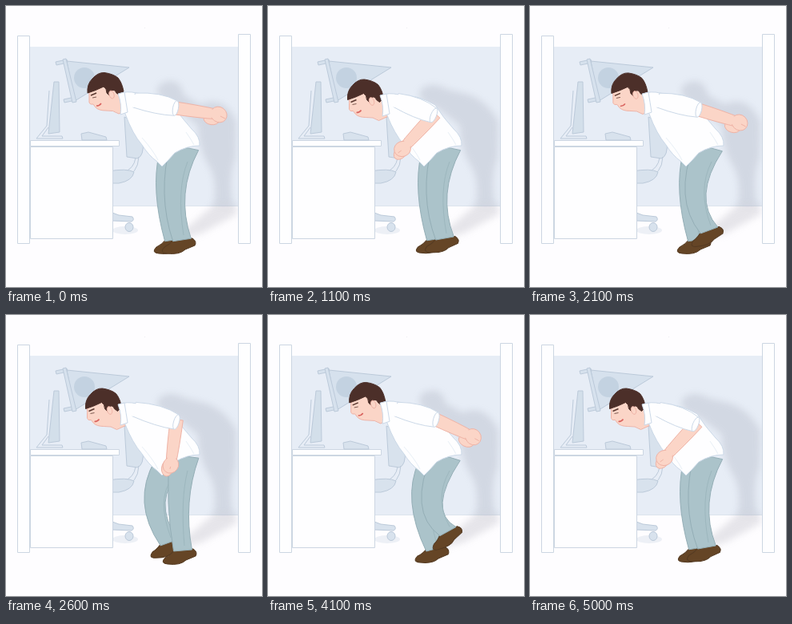
Animation, 320 px wide and 352 px high, one loop 5.1 s. Source, as an HTML page with a canvas:

```html
<!DOCTYPE html>
<html lang="en">
<head>
<meta charset="utf-8">
<title>Office swing</title>
<style>
html, body { margin: 0; width: 100%; height: 100%; overflow: hidden; background: #fefdff; }
canvas { display: block; }
</style>
</head>
<body>
<canvas id="stage" width="320" height="352"></canvas>
<script>
const ctx = document.getElementById('stage').getContext('2d');
const LOOP = 5100, STEP = 100, SWING = 1950;
const LINE = '#bccada', EDGE = '#ccd6e2', SKIN = '#fbd5c7', SKIN_LINE = '#efb3a6';
const SHIRT_LINE = '#ccd9e8', CLOTH = '#abc3ca', CLOTH_LINE = '#94aeb6';

// phase, head drop, elbow x y, hand x y, far ankle x y, far knee x, near ankle x y, near knee x
const POSES = [
  [0, 0, 212, 128, 266, 136, 210, 293, 201, 220, 293, 211],
  [.077, .05, 211, 130, 262, 146, 209, 293, 200, 224, 281, 207],
  [.1, .1, 210, 131, 257, 152, 209, 293, 193, 225, 271, 205],
  [.2, .6, 213, 136, 239, 178, 207, 292, 191, 225, 277, 209],
  [.333, 1, 213, 134, 206, 188, 204, 285, 186, 221, 295, 216],
  [.564, 1, 207, 137, 168, 179, 210, 292, 201, 221, 291, 211],
  [.65, 1, 209, 140, 208, 192, 209, 292, 198, 221, 292, 211],
  [.744, 1, 209, 146, 249, 180, 209, 292, 195, 220, 292, 210],
  [.85, .45, 211, 138, 266, 160, 209, 293, 198, 220, 293, 211],
];

const mix = (a, b, u) => a + (b - a) * u;

function poseAt(phase) {
  const i = POSES.findLastIndex(p => p[0] <= phase);
  const a = POSES[i], b = POSES[(i + 1) % POSES.length];
  const u = (phase - a[0]) / ((b[0] || 1) - a[0]);
  return a.map((v, j) => mix(v, b[j], u));
}

function paint(path, fill, line, width = 1) {
  if (fill) { ctx.fillStyle = fill; ctx.fill(path); }
  if (line) { ctx.strokeStyle = line; ctx.lineWidth = width; ctx.stroke(path); }
}
const shape = (d, fill, line, width) => paint(new Path2D(d), fill, line, width);

function box(x, y, w, h) {
  const p = new Path2D();
  p.rect(x + .5, y + .5, w, h);
  paint(p, '#fefeff', EDGE);
}

function oval(x, y, rx, ry, angle, fill, line) {
  const p = new Path2D();
  p.ellipse(x, y, rx, ry, angle, 0, 7);
  paint(p, fill, line);
}

// Tapered tube through three joints given as [x, y, half width]
function limb(a, b, c, fill, line) {
  const side = s => [a, b, c].map(([x, y, w], i) => {
    const [p, q] = [[a, b], [a, c], [b, c]][i];
    const len = Math.hypot(q[0] - p[0], q[1] - p[1]) || 1;
    return [x - s * w * (q[1] - p[1]) / len, y + s * w * (q[0] - p[0]) / len];
  });
  const ctrl = (p, q, r) => [0, 1].map(k => 2 * q[k] - (p[k] + r[k]) / 2);
  const [l0, l1, l2] = side(1), [r0, r1, r2] = side(-1);
  shape(`M${l0}Q${ctrl(l0, l1, l2)} ${l2}L${r2}Q${ctrl(r0, r1, r2)} ${r0}Z`, fill, line);
}

function room() {
  ctx.fillStyle = '#fefdff';
  ctx.fillRect(0, 0, 320, 352);
  ctx.fillStyle = '#e7edf6';
  ctx.fillRect(30, 51, 260, 199);
  shape('M133 250.5H290', null, '#dce4ed');
  ctx.fillStyle = '#ececf2';
  ctx.fillRect(173, 27, 1, 1);
}

function pennant() {
  const fill = '#d6e1ed';
  shape('M76 69L154 77L86 119Z', fill, LINE);
  oval(98, 90, 13, 13, 0, '#c3d2e1');
  shape('M62 70L76 67L77 71L63 74ZM72 117L86 114L87 118L73 121Z', fill, LINE);
  shape('M71 67L75 66L88 120L83 121Z', fill, LINE);
}

function chair() {
  const fill = '#d8e2ed';
  oval(149, 281, 16, 5, 0, '#edf0f6');
  shape('M148 139C158 142 170 154 171 169Q173 188 164 191L151 189Z', fill, LINE);
  shape('M166 189Q165 211 145 216M162 190Q160 204 147 208', null, LINE);
  shape('M128 207Q151 203 160 208Q158 219 141 222L128 222Z', fill, LINE);
  shape('M133 259L141 262L158 264Q161 268 157 270L133 269Z', fill, LINE);
  oval(154, 277, 5, 5.5, 0, fill, LINE);
}

function desk() {
  box(30, 176, 103, 115);
  box(30, 168, 111, 7);
  shape('M94 160L103 158L125 164L126 168H95Z', '#d8e2ed', LINE);
  shape('M54 106L51 150L38 166H71L70 163H45L53 152', null, LINE);
  shape('M60 95L66 95L67 158L53 160Z', '#d3dfea', LINE);
}

function shadow(drop) {
  const y = 5 * drop;
  ctx.save();
  ctx.beginPath();
  ctx.rect(30, 51, 260, 250);
  ctx.clip();
  ctx.filter = 'blur(4px)';
  shape(`M189 ${105 + y}Q192 ${94 + y} 208 ${94 + y}Q219 ${96 + y} 222 ${mix(112, 104, drop)}
    L243 ${mix(124, 109, drop)}Q272 ${mix(110, 115, drop)} 288 145L287 190Q277 215 284 250
    L260 250Q264 225 257 206Q240 180 240 150L212 128Q192 123 189 ${105 + y}Z`, 'rgba(142,146,164,.23)');
  shape('M260 249L288 249L288 261L244 285L207 294Z', 'rgba(135,135,150,.2)');
  ctx.restore();
}

function leg(hip, knee, x, y) {
  ctx.save();
  ctx.translate(x, y);
  ctx.rotate(Math.min(0, y - 293) * .016);
  shape('M-9 -2Q-15 6 -22 9Q-29 16 -19 17Q-3 19 4 12L16 7Q19 2 13 -2Z', '#654526', '#543a22');
  ctx.restore();
  limb([...hip, 18], [knee, 235, 13], [x, y, 11.5], CLOTH, CLOTH_LINE);
  shape(`M${hip[0] + 4} ${hip[1] + 18}Q${knee + 2} 230 ${x + 2} ${y - 6}`, null, '#9db7be');
}

function head(drop) {
  ctx.save();
  ctx.translate(-2.5 * drop, 8.5 * drop);
  shape('M104 106L104 113L104 121Q105 124 109 123L112 127Q116 131 125 131Q134 130 141 135L152 130L144 106L122 97Z',
    SKIN, SKIN_LINE);
  shape('M102 109Q101 98 108 91Q115 83 123 83.5Q134 85 140 90Q145 96 147 107L142 112L138 109Q136 104 132 106L129 112L126 109Q126 103 122 101Q112 106 102 109Z',
    '#4c2f29', '#4c2f29');
  oval(132, 111, 3, 5, -.3, SKIN, SKIN_LINE);
  shape('M106 112L113 109', null, '#58372f', 1.4);
  shape('M108 115L113 114', null, '#7d5a50');
  shape('M113 125Q117 125 119 122', null, '#d9635f', 1.5);
  ctx.restore();
}

function shirt(drop) {
  const y = 2 * drop;
  shape(`M141 ${110 + y}Q151 ${106 + y} 163 ${109 + y}Q190 112 209 124Q219 140 232 154Q243 164 242 175
    Q226 175 211 184L202 194L195 201L189 195Q178 187 170 174Q158 160 149 ${135 + y}Z`, '#fefeff', SHIRT_LINE);
  shape(`M140 ${110 + y}L148 ${108 + y}Q150 ${120 + y} 152 ${133 + y}L143 ${136 + y}Q145 ${123 + y} 140 ${110 + y}Z`,
    '#fefeff', SHIRT_LINE);
  shape('M170 165Q184 181 190 193M225 158Q232 168 235 174', null, '#e8eff6');
}

function arm(ex, ey, hx, hy) {
  const angle = Math.atan2(hy - ey, hx - ex);
  const dx = Math.cos(angle), dy = Math.sin(angle);
  oval(hx - 5 - dx * 4, hy - dy * 2 + 6, 10, 7, angle, SKIN, SKIN_LINE);
  limb([ex - dx * 3, ey - dy * 3, 8], [(ex + hx) / 2, (ey + hy) / 2, 7.5], [hx, hy, 6], SKIN, SKIN_LINE);
  oval(hx, hy, 10.5, 9.5, angle + .5, SKIN, SKIN_LINE);
  ctx.save();
  ctx.translate(hx - dx * 5, hy - dy * 5);
  ctx.rotate(angle);
  ctx.fillStyle = SKIN;
  ctx.fillRect(-8, -5, 10, 10);
  ctx.restore();
  shape(`M${hx + dx * 2} ${hy + 2}l${dx * 6} 3`, null, SKIN_LINE);
  limb([160, 118, 9], [mix(160, ex, .55), mix(118, ey, .55) - 1, 12], [ex, ey, 9.5], '#fefeff', SHIRT_LINE);
  oval(ex, ey, 3.5, 9.5, Math.atan2(ey - 118, ex - 160), '#fefeff', SHIRT_LINE);
  oval(160, 119, 9, 8, 0, '#fefeff');
}

function draw(time) {
  const t = Math.floor(time % LOOP / STEP) * STEP;
  const [, drop, ex, ey, hx, hy, farX, farY, farKnee, nearX, nearY, nearKnee] = poseAt(t % SWING / SWING);
  room();
  pennant();
  chair();
  desk();
  shadow(drop);
  box(14, 37, 15, 260);
  box(290, 35, 15, 262);
  leg([mix(208, farKnee + 10, .4), 188], farKnee, farX, farY);
  leg([223, 177], nearKnee, nearX, nearY);
  head(drop);
  shirt(drop);
  arm(ex, ey, hx, hy);
}

const start = performance.now();
(function tick() {
  draw(performance.now() - start);
  requestAnimationFrame(tick);
})();
</script>
</body>
</html>
```
